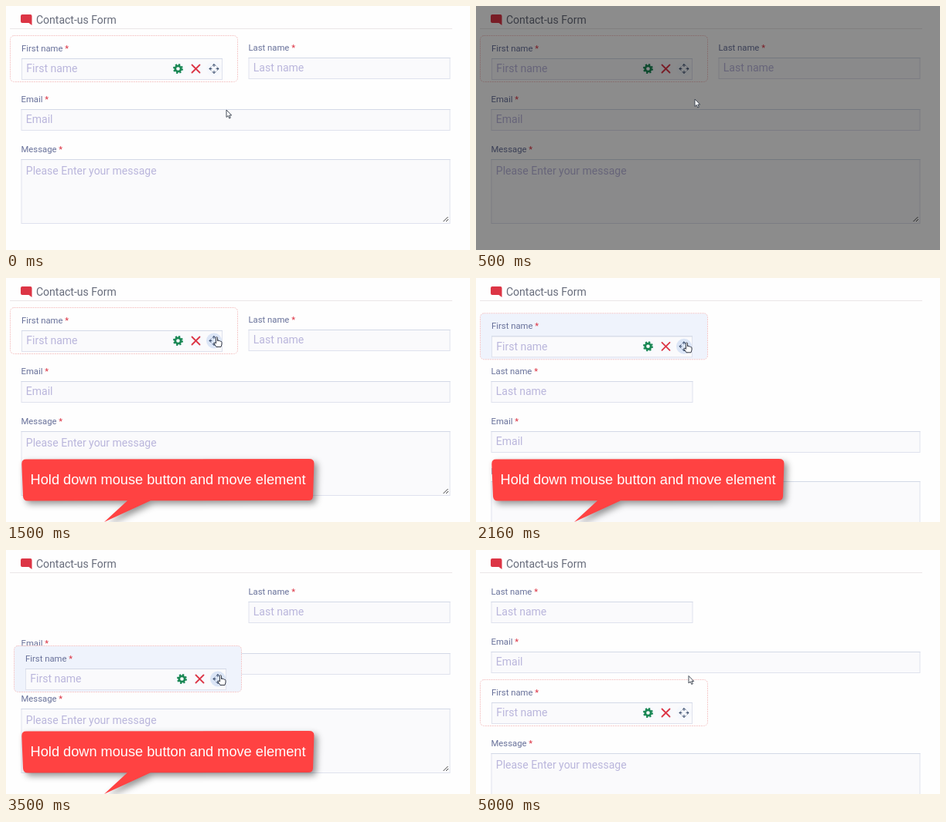
Recreate the animation shown at these times as an HTML page. Size 600 by 317 pixels, loop 5.5 s.

```html
<!DOCTYPE html>
<html lang="en">
<head>
<meta charset="utf-8">
<title>Form builder drag</title>
<style>
  html, body { margin: 0; width: 100%; height: 100%; overflow: hidden; background: #fefefe; }
  #stage { position: relative; width: 100%; height: 100%; overflow: hidden; contain: strict; }
  svg { position: absolute; left: 0; top: 0; width: 600px; height: 317px; overflow: visible; }
  text { font: 14px Roboto, sans-serif; white-space: pre; }
  .title { fill: #676c7b; }
  .label { font-size: 11.3px; fill: #68719a; }
  .star { fill: #dc3545; }
  .hint { fill: #bab6dc; }
  .input { fill: #fafafc; stroke: #dfe2ee; }
  .edge { stroke: #d3d9e7; }
  .frame { fill: #fefefe; stroke: #f6c9c9; stroke-dasharray: 2 1; }
  .frame.held { fill: #eff3fc; }
  .bubble { fill: #ff4242; filter: drop-shadow(4px 4px 4px rgba(0, 0, 0, .42)); }
  .bubble-text { font: 18.2px "Liberation Sans", Arial, sans-serif; fill: #fff; }
  .line { fill: none; stroke-linecap: round; stroke-linejoin: round; }
</style>
</head>
<body>
<div id="stage">
  <svg id="form" viewBox="0 0 600 317">
    <path fill="#dc3545" d="M21 11H31.500Q33.500 11 33.500 13V25L29.500 22H21Q19 22 19 20V13Q19 11 21 11Z"/>
    <text class="title" x="39" y="23.300">Contact-us Form</text>
    <path stroke="#ebe6e8" d="M5 29.500H577"/>
    <g id="fields"></g>
  </svg>
  <svg id="top" viewBox="0 0 600 317">
    <rect id="shade" width="600" height="317"/>
    <path id="arrow" fill="#fff" stroke="#333a48" stroke-width=".9" stroke-linejoin="round"
      d="M0 0V9.500L2.200 7.500 3.800 11 5.300 10.300 3.800 7H6.700Z"/>
    <path id="hand" fill="#fff" stroke="#1d2330" stroke-width=".9" stroke-linejoin="round"
      d="M-1 .8Q0-.6 1 .8V5Q2.200 4.200 3 5.200 4 4.600 4.800 5.800 6.300 5.400 6.500 7V9.500L5.500 13H-.5L-3.500 8.500Q-3.600 7-2.200 7.400L-1 8.600Z"/>
  </svg>
  <svg class="callout" viewBox="0 0 600 317">
    <path class="bubble" d="M26 235.500 392 235Q398.500 235 398.400 241L397 283.500Q396.800 289 391 289L187 289.300 127 317 157 289.300 28 289.500Q22.300 289.500 22 283.500L20.300 242Q20 235.500 26 235.500Z"/>
    <text class="bubble-text" x="31.600" y="268.300">Hold down mouse button and move element</text>
  </svg>
</div>
<script>
const TICK = 500 / 3, LOOP = 5500;
const $ = id => document.getElementById(id);

const field = (id, name, hint, width, { height = 27, hintY = 18.3, extra = '' } = {}) => `
  <g id="${id}">
    <rect class="input" x=".5" y=".5" width="${width}" height="${height}"/>
    <path class="edge" d="M0 .5H${width + 1}"/>
    <text class="label" x="0" y="-9.200">${name}<tspan class="star"> *</tspan></text>
    <text class="hint" x="6.300" y="${hintY}">${hint}</text>${extra}
  </g>`;

const arrowHeads = [0, 90, 180, 270].map(a =>
  `<path class="line" stroke="#2d4163" transform="rotate(${a})" d="M-2-4 0-6 2-4M0-5.500V-3"/>`).join('');

const tools = `
  <g transform="translate(202.500 13.500)" fill="none" stroke="#198754">
    <circle r="10" fill="#f8f9fd" stroke="none"/>
    <circle r="3.700" stroke-width="2.800"/>
    <circle r="5.500" stroke-width="2" stroke-dasharray="2.160"/>
  </g>
  <g transform="translate(225.500 13.500)">
    <circle r="10" fill="#f8f9fd"/>
    <path class="line" stroke="#dc3545" stroke-width="1.800" d="M-5-5 5 5M5-5-5 5"/>
  </g>
  <g transform="translate(249 13.500)"><circle id="grip" r="10"/>${arrowHeads}</g>`;

const resizer = '<path stroke="#444" d="M546 81 552 75M549.500 81 552.500 78"/>';

$('fields').innerHTML =
  field('last', 'Last name', 'Last name', 260) +
  field('email', 'Email', 'Email', 554) +
  field('message', 'Message', 'Please Enter your message', 554, { height: 83, hintY: 20.3, extra: resizer }) +
  `<g id="first">
    <rect id="frame" class="frame" x="-14.500" y="-29.500" width="294" height="60" rx="5"/>
    ${field('firstField', 'First name', 'First name', 259, { extra: tools })}
  </g>`;

// Field positions: [last x, last y, email y, message y], valid from a tick on.
const layouts = [
  [0, [313.5, 67, 134, 199]],
  [12, [19.5, 134, 199, 264]],
  [20, [313.5, 67, 134, 206]],
  [25, [19.5, 67, 132, 264]]
];

// Key poses: [tick, x, y]
const dragPath = [[11, 0, 0], [12, 0, 2], [17, 0, 28.5], [18, 4.3, 44], [19, 4.6, 60], [21, 5, 86], [23, 5, 86], [24, 4, 92], [25, 0, 130]];
const cursorPath = [[2, 285, 135], [3, 283, 121], [4, 279, 96], [5, 275.5, 83.5], [6, 275, 80], [8, 274, 77], [9, 272.5, 76.5]];
const releasePath = [[25, 277, 169], [29, 275, 163.5]];

function along(path, k) {
  const next = path.findIndex(p => p[0] > k);
  if (next === 0) return path[0].slice(1);
  if (next < 0) return path[path.length - 1].slice(1);
  const a = path[next - 1], b = path[next], u = (k - a[0]) / (b[0] - a[0]);
  return [1, 2].map(i => a[i] + (b[i] - a[i]) * u);
}

const place = (id, x, y) => $(id).setAttribute('transform', `translate(${x} ${y})`);

const flat = document.querySelector('.callout');
const swung = flat.cloneNode(true);
flat.after(swung);

// The part left of the fold swings towards the viewer.
function drawCallout(k) {
  const opening = k >= 4 && k < 8;
  const fold = opening ? 398 - 94.5 * (k - 4) : 0;
  flat.style.opacity = k >= 4 && k < 30 ? Math.min(1, (30 - k) / 4) : 0;
  flat.style.clipPath = `inset(-60px -60px -60px ${opening ? fold : -60}px)`;
  swung.style.display = opening ? '' : 'none';
  swung.style.clipPath = `inset(-60px ${600 - fold}px -60px -60px)`;
  swung.style.transformOrigin = `${fold}px 290px`;
  swung.style.transform = 'matrix3d(.73,-.145,0,.00114, 0,1,0,0, 0,0,1,0, 0,0,0,1)';
}

function draw(k) {
  const dropped = k >= 25;
  const [lastX, lastY, emailY, messageY] = layouts.filter(l => l[0] <= k).pop()[1];
  place('last', lastX, lastY);
  place('email', 19.5, emailY);
  place('message', 19.5, messageY);

  const [dx, dy] = along(dragPath, k);
  place('first', 20 + dx, 68 + dy);
  $('frame').classList.toggle('held', k >= 12 && !dropped);
  $('grip').setAttribute('fill', k >= 6 && !dropped ? '#dbe5f6' : '#f6f8fd');

  const pointing = k >= 5 && !dropped;
  const [cx, cy] = along(dropped ? releasePath : cursorPath, k);
  place('arrow', cx, cy);
  place('hand', cx + dx, cy + dy);
  $('arrow').style.opacity = pointing ? 0 : 1;
  $('hand').style.opacity = pointing ? 1 : 0;

  $('shade').style.opacity = k === 2 ? 1 : k === 3 ? .45 : 0;
  drawCallout(k);
}

const start = performance.now();
function frame() {
  const t = (performance.now() - start) % LOOP;
  draw(Math.floor((t + 7) / TICK) % 33);
  requestAnimationFrame(frame);
}
frame();
</script>
</body>
</html>
```
